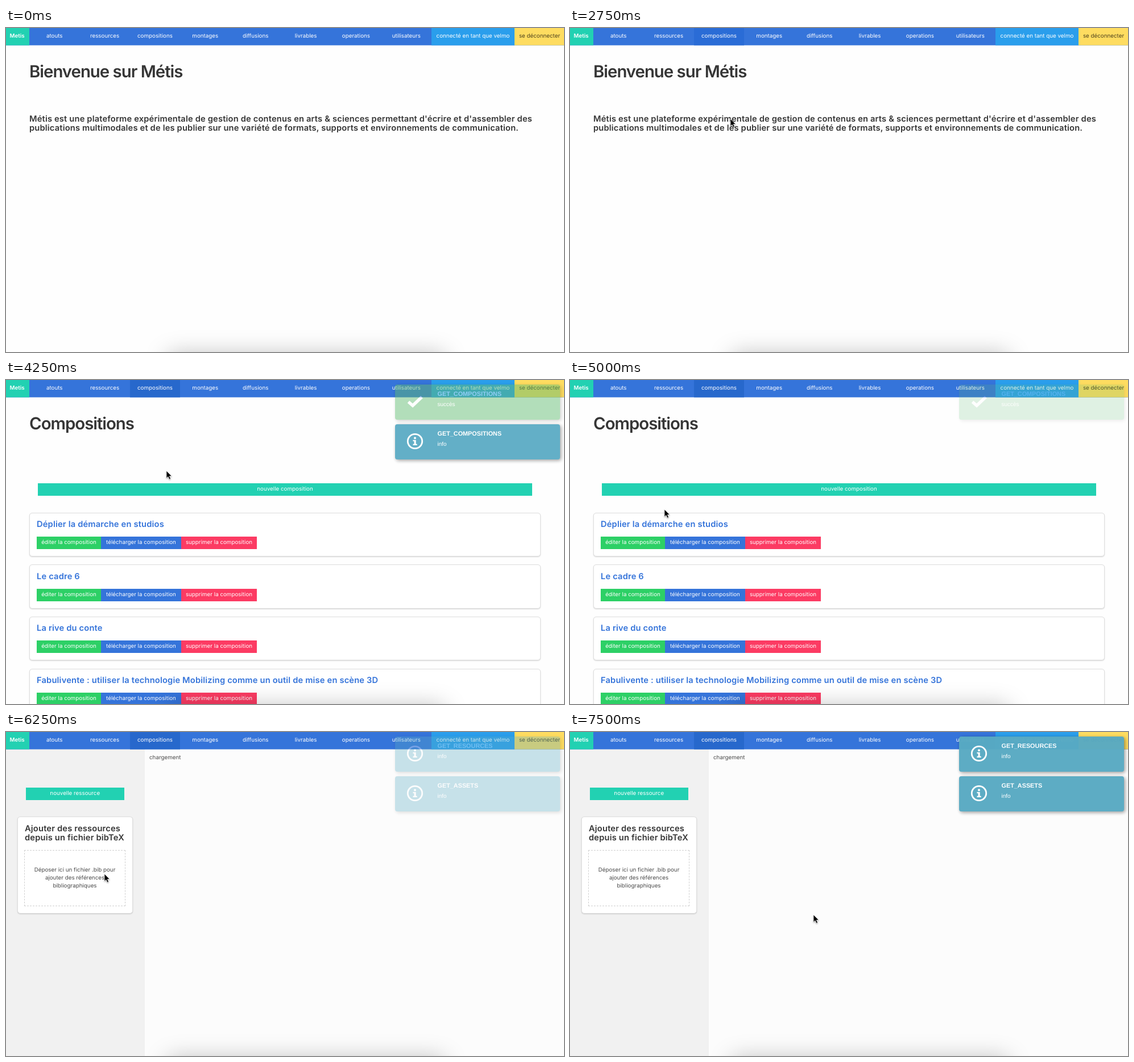
These frames come from a looping animation (981x571 px, 8000 ms). An HTML page:

```html
<!DOCTYPE html>
<html lang="fr">
<head>
<meta charset="utf-8">
<title>Metis</title>
<style>
  html, body { margin: 0; width: 100%; height: 100%; overflow: hidden; background: #fff; }
  #stage {
    position: relative; width: 981px; height: 571px; overflow: hidden; background: #fefefe;
    font: 9.8px/14px Inter, "Open Sans", sans-serif; color: #363636;
    text-rendering: geometricPrecision; cursor: default;
  }
  #stage div, #stage svg { position: absolute; box-sizing: border-box; }
  .page { inset: 0; }
  .text { white-space: pre; transform: translateY(-50%); }
  .mid { transform: translate(-50%, -50%); }
  .h1 { font-size: 29.4px; font-weight: 600; letter-spacing: -1.02px; line-height: 36px; }
  .h2 { font-size: 14.7px; font-weight: 600; letter-spacing: .165px; line-height: 16px; }
  .brand { font-weight: 600; }
  .link { color: #3574da; }
  .white { color: #fff; }
  .soft { color: #4a4a4a; }
  .dim { color: rgba(0, 0, 0, .7); }
  .teal { background: #22d1b2; }
  .blue { background: #3574da; }
  .sky { background: #2a9eec; }
  .yellow { background: #fedc60; }
  .green { background: #2dd066; }
  .red { background: #fc3b63; }
  .nav { clip-path: inset(0 0 .5px 0); }
  .card { background: #fff; border: 1px solid #dedede; border-radius: 5px; box-shadow: 0 1px 2px rgba(0, 0, 0, .16); }
  .side { background: #f1f1f1; }
  .drop { border: 1px dashed #cfcfcf; }
  .toast { border-radius: 4px; color: #fff; box-shadow: 2px 2px 6px rgba(0, 0, 0, .4); }
  .toast .text { font: 10px/14px "Liberation Sans", Arial, sans-serif; }
  .toast .name { font-size: 10.85px; font-weight: bold; }
  .info { background: #58aac3; }
  .ok { background: #60bb71; }
  .status { background: #f2f2f2; color: #666; border-radius: 0 3px 0 0; }
  .glow { box-shadow: 0 0 40px rgba(0, 0, 0, .26); }
</style>
</head>
<body>
<div id="stage"></div>
<script>
const stage = document.getElementById('stage');

function add(parent, cls, html = '') {
  const el = document.createElement('div');
  el.className = cls;
  el.innerHTML = html;
  parent.append(el);
  return el;
}
function box(parent, cls, x, y, w, h) {
  const el = add(parent, cls);
  el.style.cssText = `left:${x}px;top:${y}px;width:${w}px;height:${h}px`;
  return el;
}
// y is the middle of the capitals; "mid" also centres on x
function text(parent, cls, x, y, str) {
  const el = add(parent, 'text ' + cls, str);
  el.style.cssText = `left:${x}px;top:${y}px`;
  return el;
}
function button(parent, color, x, y, w, label) {
  box(parent, color, x, y, w, 22);
  text(parent, 'mid white', x + w / 2, y + 11, label);
}

// Pages
const home = add(stage, 'page');
text(home, 'h1', 41, 77.5, 'Bienvenue sur Métis');
text(home, 'h2', 41, 160, "Métis est une plateforme expérimentale de gestion de contenus en arts &amp; sciences permettant d'écrire et d'assembler des");
text(home, 'h2', 41, 176, 'publications multimodales et de les publier sur une variété de formats, supports et environnements de communication.');

const list = add(stage, 'page');
text(list, 'h1', 41, 77.5, 'Compositions');
button(list, 'teal', 56, 182, 869, 'nouvelle composition');
const titles = [
  'Déplier la démarche en studios',
  'Le cadre 6',
  'La rive du conte',
  'Fabulivente : utiliser la technologie Mobilizing comme un outil de mise en scène 3D'
].map((title, i) => {
  const y = 233.5 + i * 91.7;
  box(list, 'card', 41, y, 899, 77.5);
  button(list, 'green', 54, y + 42.5, 113, 'éditer la composition');
  button(list, 'blue', 167, y + 42.5, 141, 'télécharger la composition');
  button(list, 'red', 308, y + 42.5, 133, 'supprimer la composition');
  return text(list, 'h2 link', 54, y + 20.5, title);
});

const resources = add(stage, 'page');
resources.style.background = '#fcfcfc';
box(resources, 'side', 0, 30, 244, 541);
button(resources, 'teal', 35, 97.5, 172.5, 'nouvelle ressource');
box(resources, 'card', 20, 149, 203, 171);
text(resources, 'h2', 33, 170, 'Ajouter des ressources');
text(resources, 'h2', 33, 186, 'depuis un fichier bibTeX');
box(resources, 'drop', 32, 208, 178, 99);
['Déposer ici un fichier .bib pour', 'ajouter des références', 'bibliographiques']
  .forEach((line, i) => text(resources, 'mid soft', 121, 243.8 + i * 14, line));
text(resources, 'soft', 252, 46, 'chargement');

// Navigation bar
const nav = box(stage, 'nav blue', 0, 0, 981, 31);
const tab = 88.375;
box(nav, 'teal', 0, 0, 41, 31);
const active = box(nav, '', 41 + 2 * tab, 0, tab, 31);
box(nav, 'sky', 748, 0, 146, 31);
box(nav, 'yellow', 894, 0, 87, 31);
text(nav, 'brand white', 6.5, 15.2, 'Metis');
['atouts', 'ressources', 'compositions', 'montages', 'diffusions', 'livrables', 'operations', 'utilisateurs']
  .forEach((label, i) => text(nav, 'mid white', 41 + (i + .5) * tab, 15.2, label));
text(nav, 'mid white', 821, 15.2, 'connecté en tant que velmo');
text(nav, 'mid dim', 938, 15.2, 'se déconnecter');

box(stage, 'glow', 285, 575, 485, 80);

// Status bar and toasts
const status = box(stage, 'status', 0, 557, 326, 14);
const address = text(status, '', 2, 8, '');

const icons = {
  info: `<circle cx="14" cy="14" r="12.7" fill="none" stroke="#fff" stroke-width="2.8"/>
    <circle cx="14" cy="8.3" r="2" fill="#fff"/>
    <path d="M10.5 11.7h5.2v7h2v2.2h-7.2v-2.2h2v-4.8h-2z" fill="#fff"/>`,
  ok: '<path d="M2.5 14.5L10 21L26 6" fill="none" stroke="#fff" stroke-width="5.4"/>'
};
function toast(kind, name) {
  const el = box(stage, 'toast ' + kind, 684, 8, 290, 61.5);
  el.innerHTML = `<svg style="left:21px;top:16px" width="28" height="28" overflow="visible">${icons[kind]}</svg>`;
  text(el, 'name', 74.5, 16.5, name);
  text(el, '', 74.5, 36, kind === 'ok' ? 'succès' : 'info');
  return el;
}
const listInfo = toast('info', 'GET_COMPOSITIONS');
const listDone = toast('ok', 'GET_COMPOSITIONS');
const resourceInfo = toast('info', 'GET_RESOURCES');
const assetInfo = toast('info', 'GET_ASSETS');

const pointer = add(stage, '', `<svg width="14" height="20" overflow="visible" style="filter:drop-shadow(0 1px 1px rgba(0,0,0,.35))">
  <path d="M0 0V13.2L3 10.4L5.1 15.2L7.5 14.1L5.4 9.5H9.4Z" fill="#000" stroke="#fff" stroke-width=".8"/></svg>`);

// Motion helpers
const ramp = (t, from, to) => Math.min(1, Math.max(0, (t - from) / (to - from)));
const ease = p => p * p * (3 - 2 * p);
const pulse = (t, start, rise, end, fall) => ramp(t, start, start + rise) * (1 - ramp(t, end, end + fall));
const show = (el, on) => { el.style.visibility = on ? 'visible' : 'hidden'; };

function place(el, slot, opacity) {
  el.style.top = 8 + slot * 70.2 + 'px';
  el.style.opacity = opacity;
}

// Each leg of the pointer's way ends at x, y
const legs = [
  { from: 250, to: 1000, x: 250, y: 41 },
  { from: 1000, to: 1750, x: 262, y: 13 },
  { from: 2000, to: 2500, x: 282, y: 160 },
  { from: 4500, to: 5000, x: 165.5, y: 228 },
  { from: 5000, to: 5500, x: 173, y: 250 },
  { from: 7000, to: 7500, x: 428, y: 322 }
];
function pointerAt(t) {
  return legs.reduce((pos, leg) => {
    const p = ease(ramp(t, leg.from, leg.to));
    return { x: pos.x + (leg.x - pos.x) * p, y: pos.y + (leg.y - pos.y) * p };
  }, { x: 217, y: 137 });
}

const LOOP = 8000, STEP = 250;
const LIST = 3750, RESOURCES = 6250;
function draw(t) {
  show(home, t < LIST);
  show(list, t >= LIST && t < RESOURCES);
  show(resources, t >= RESOURCES);

  show(active, t >= 1500);
  active.style.background = t < LIST ? '#2a6cd6' : '#2768cc';
  titles[0].style.color = t >= 5250 ? '#363636' : '';

  status.style.opacity = .95 * (pulse(t, 1250, 250, 2250, 250) + pulse(t, 5000, 250, 5750, 500));
  address.textContent = 'localhost:3000/' +
    (t < LIST ? 'compositions' : 'composition/f705694c-d2ab-48a1-b8e5');

  place(listInfo, t < 4250 ? 0 : 1, .93 * pulse(t, 3500, 500, 4500, 500));
  place(listDone, 0, .95 * pulse(t, 4000, 500, 4400, 750));
  const loading = .97 * ramp(t, 6000, 6750);
  place(resourceInfo, 0, loading);
  place(assetInfo, 1, loading);

  const { x, y } = pointerAt(t);
  show(pointer, t >= 250);
  pointer.style.left = x + 'px';
  pointer.style.top = y + 'px';
}

const start = performance.now();
function tick(now) {
  const t = Math.max(0, now - start) % LOOP;
  draw(Math.floor(t / STEP) * STEP);
  requestAnimationFrame(tick);
}
draw(0);
requestAnimationFrame(tick);
</script>
</body>
</html>
```
